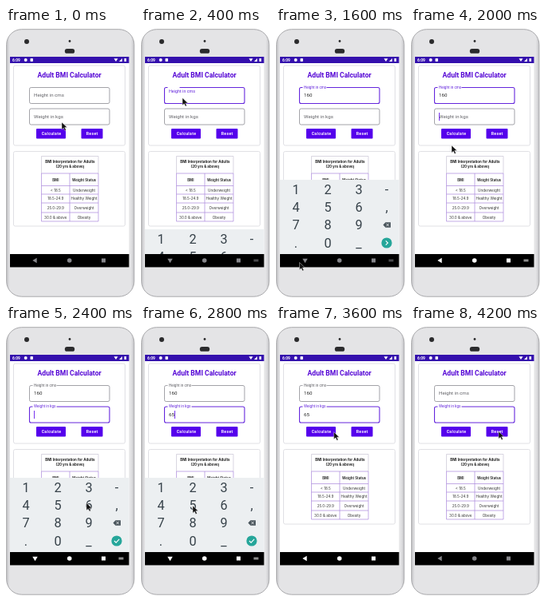
An HTML page for the animation above (4.3 s loop, 162 by 338 pixels).

```html
<!DOCTYPE html>
<html lang="en">
<head>
<meta charset="utf-8">
<title>BMI calculator demo</title>
<style>
html, body { margin: 0; width: 100%; height: 100%; overflow: hidden; background: #fff; }
svg { display: block; width: 162px; height: 338px; font-family: Roboto, sans-serif; }
.mid { text-anchor: middle; }
.bold { font-weight: 700; }
#table { font-family: Inter, sans-serif; }
</style>
</head>
<body>
<svg viewBox="0 0 162 338">
  <defs>
    <linearGradient id="shell">
      <stop offset="0" stop-color="#c4c4c7"/><stop offset=".025" stop-color="#e4e4e6"/>
      <stop offset=".975" stop-color="#e4e4e6"/><stop offset="1" stop-color="#c4c4c7"/>
    </linearGradient>
    <clipPath id="display"><rect x="5" y="36" width="149.5" height="247"/></clipPath>
  </defs>

  <rect x=".7" y="1.7" width="160.2" height="334.5" rx="19" fill="url(#shell)" stroke="#a8a8ab"/>
  <g fill="#2b2b2d">
    <circle cx="26" cy="17" r="3"/>
    <circle cx="80" cy="16.5" r="1.4"/>
    <rect x="73.8" y="26" width="12.4" height="5.8" rx="2.9"/>
  </g>
  <rect x="5" y="36" width="149.5" height="264" fill="#fff"/>

  <rect x="5" y="36" width="149.5" height="8" fill="#3410ad"/>
  <g fill="#fff">
    <text class="bold" x="8" y="41.8" font-size="4.9">6:09</text>
    <circle cx="24.7" cy="40" r="2"/>
    <rect x="30.5" y="38" width="3.4" height="4" rx=".7"/>
    <path d="M135.5 38.3h5l-2.5 3.8zM142 42l4-4v4zM148.5 38h2.6v4h-2.6z"/>
  </g>

  <g clip-path="url(#display)">
    <g fill="none" stroke="#d9d9dd" stroke-width=".8">
      <rect x="9.5" y="47" width="140" height="100" rx="2"/>
      <rect x="9.5" y="154.5" width="140" height="93.5" rx="2"/>
    </g>
    <text class="mid bold" x="79.6" y="61.8" font-size="8.65" fill="#5405d5">Adult BMI Calculator</text>
    <g id="fields"></g>
    <g fill="#5500ec">
      <rect x="38" y="126" width="37" height="12.5" rx="1"/>
      <rect x="94.5" y="126" width="27" height="12.5" rx="1"/>
    </g>
    <g class="mid bold" font-size="5.1" letter-spacing=".35" fill="#fff">
      <text x="57" y="134">Calculate</text><text x="108.2" y="134">Reset</text>
    </g>
    <g id="table" class="mid" font-size="4.6" fill="#333"></g>
    <g id="keyboard"><rect x="5" y="190" width="149.5" height="93" fill="#eceff1"/></g>
  </g>

  <rect x="5" y="283" width="149.5" height="16.5" fill="#000"/>
  <rect id="ripple" x="18.5" y="283" width="37" height="16" rx="8" fill="#1d1d1f"/>
  <g id="nav">
    <path id="back" d="M33.3 291l5.4-3.2v6.4z"/>
    <circle cx="79.7" cy="291" r="2.8"/>
    <rect x="120" y="288.5" width="5" height="5"/>
    <path id="switcher" d="M141.5 289.5h6v3h-6z" opacity=".55"/>
  </g>
  <path id="pointer" d="M0 0v9.2l2.2-2 1.6 3.4 1.6-.8-1.6-3.3h3z" fill="#111" stroke="#fff" stroke-width=".4"/>
</svg>

<script>
const LOOP = 4300, STEP = 100;
const $ = id => document.getElementById(id);
const set = (node, attrs) => {
  for (const key in attrs) node.setAttribute(key, attrs[key]);
  return node;
};
const add = (parent, tag, attrs, text = '') => {
  const node = set(document.createElementNS('http://www.w3.org/2000/svg', tag), attrs);
  node.textContent = text;
  return parent.appendChild(node);
};
const ramp = (t, from, to) => Math.min(1, Math.max(0, (t - from) / (to - from)));
const between = (t, from, to) => t >= from && t < to;

// BMI table
const table = $('table');
add(table, 'path', { d: 'M44.5 182V160.5H116V182', fill: 'none', stroke: '#c9c4d4', 'stroke-width': .7 });
add(table, 'path', {
  d: 'M44.5 182H116V242H44.5zM80 182V242M44.5 197.5H116M44.5 208H116M44.5 219H116M44.5 231H116',
  fill: 'none', stroke: '#a987dc', 'stroke-width': .7
});
const heading = { class: 'mid bold', x: 80.4, 'font-size': 4.5, fill: '#222' };
add(table, 'text', { ...heading, y: 169 }, 'BMI Interpretation for Adults');
add(table, 'text', { ...heading, y: 174.5 }, '(20 yrs & above)');
[
  [191.5, 'BMI', 'Weight Status'],
  [204.5, '< 18.5', 'Underweight'],
  [215, '18.5-24.9', 'Healthy Weight'],
  [226.8, '25.0-29.9', 'Overweight'],
  [238.5, '30.0 & above', 'Obesity']
].forEach(([y, range, status], row) => {
  const font = row ? {} : { class: 'mid bold', 'font-size': 4.4 };
  add(table, 'text', { x: 62.3, y, ...font }, range);
  add(table, 'text', { x: 98, y, ...font }, status);
});

// Numeric keyboard
const columns = [25, 65, 104, 139], rows = [202, 224, 246.5, 269];
['123-', '456,', '789', '.0_'].forEach((keys, r) => [...keys].forEach((key, c) =>
  add($('keyboard'), 'text', { class: 'mid', x: columns[c], y: rows[r] + 5.7, 'font-size': 16.3, fill: '#37424a' }, key)));
add($('keyboard'), 'path', { d: 'M134.5 246.5l3-3.2h6.5v6.4h-6.5z', fill: '#4a555c' });
add($('keyboard'), 'path', { d: 'M138.5 244.8l3.4 3.4m0-3.4l-3.4 3.4', stroke: '#fff', 'stroke-width': .8 });
add($('keyboard'), 'circle', { cx: 139, cy: 269, r: 6.6, fill: '#26a69a' });
const action = add($('keyboard'), 'path', { fill: 'none', stroke: '#fff', 'stroke-width': 1.1 });

function makeField(y, name) {
  const group = $('fields');
  const box = add(group, 'rect', { x: 29.5, y, width: 100.5, height: 20, rx: 2, fill: 'none' });
  const gap = add(group, 'rect', { x: 33.5, y: y - 1, height: 2.2, fill: '#fff' });
  const label = add(group, 'text', { x: 35 }, name);
  const value = add(group, 'text', { x: 35, y: y + 11.6, 'font-size': 6.2, fill: '#222' });
  const caret = add(group, 'rect', { y: y + 5, width: .8, height: 10, fill: '#5500ec' });
  return (text, float, focused, caretOn) => {
    const color = focused ? '#6425dc' : '#8c8c92';
    set(box, { stroke: color, 'stroke-width': focused ? 1.1 : .8 });
    set(gap, { width: 30 * float });
    set(label, {
      y: y + 11.6 - 10.2 * float, 'font-size': 6.2 - 1.6 * float,
      fill: focused && float ? color : '#606065'
    });
    value.textContent = text;
    set(caret, { x: 35 + text.length * 3.5, opacity: +caretOn });
  };
}
const height = makeField(74.5, 'Height in cms');
const weight = makeField(101, 'Weight in kgs');

// Pointer path: time, x, y
const path = [
  [0, 70, 118], [300, 52, 87], [500, 52, 88], [800, 25, 203], [900, 25, 203],
  [1000, 104, 226], [1100, 104, 226], [1200, 65, 267], [1300, 65, 267], [1500, 30, 294],
  [1700, 29, 293], [1900, 45, 113], [2000, 51, 147], [2300, 101, 222], [2500, 101, 221],
  [2700, 65, 225], [2800, 65, 225], [2900, 34, 290], [3000, 34, 290], [3100, 38, 125],
  [3300, 52, 132], [3500, 56, 133], [3800, 106, 132], [4200, 110, 132]
];
function pointerAt(t) {
  const i = Math.max(1, path.findIndex(p => p[0] >= t));
  const [t0, x0, y0] = path[i - 1], [t1, x1, y1] = path[i];
  const k = ramp(t, t0, t1);
  return [x0 + (x1 - x0) * k, y0 + (y1 - y0) * k];
}

function draw(t) {
  const reset = t >= 3900;
  const onHeight = between(t, 400, 2100), onWeight = t >= 2100;
  const heightText = reset ? '' : '160'.slice(0, (t >= 1000) + (t >= 1100) + (t >= 1300));
  const weightText = reset ? '' : '65'.slice(0, (t >= 2500) + (t >= 2800));
  height(heightText, ramp(t, 300, 500) - ramp(t, 3800, 4000), onHeight, between(t, 500, 1500));
  weight(weightText, ramp(t, 2000, 2200), onWeight, between(t, 2000, 3600));

  const open = t < 1700 ? ramp(t, 300, 600)
    : t < 2000 ? 1 - ramp(t, 1600, 1800)
    : t < 3100 ? ramp(t, 2000, 2300) : 0;
  set($('keyboard'), { transform: `translate(0 ${93 * (1 - open)})` });
  set(action, { d: onWeight ? 'M136 269l2.2 2.2 4-4.4' : 'M137.8 266.3l2.7 2.7-2.7 2.7' });

  set($('nav'), { fill: between(t, 1700, 3700) ? '#fff' : '#85858a' });
  set($('back'), { transform: `rotate(${open ? -90 : 0} 36.5 291)` });
  set($('switcher'), { visibility: open || t === 2000 ? 'visible' : 'hidden' });
  set($('ripple'), { opacity: +(t === 1700 || t === 3100) });
  set($('pointer'), { transform: `translate(${pointerAt(t)})` });
}

const start = performance.now();
function tick() {
  const t = (performance.now() - start) % LOOP;
  draw(Math.floor(t / STEP) * STEP);
  requestAnimationFrame(tick);
}
tick();
</script>
</body>
</html>
```
